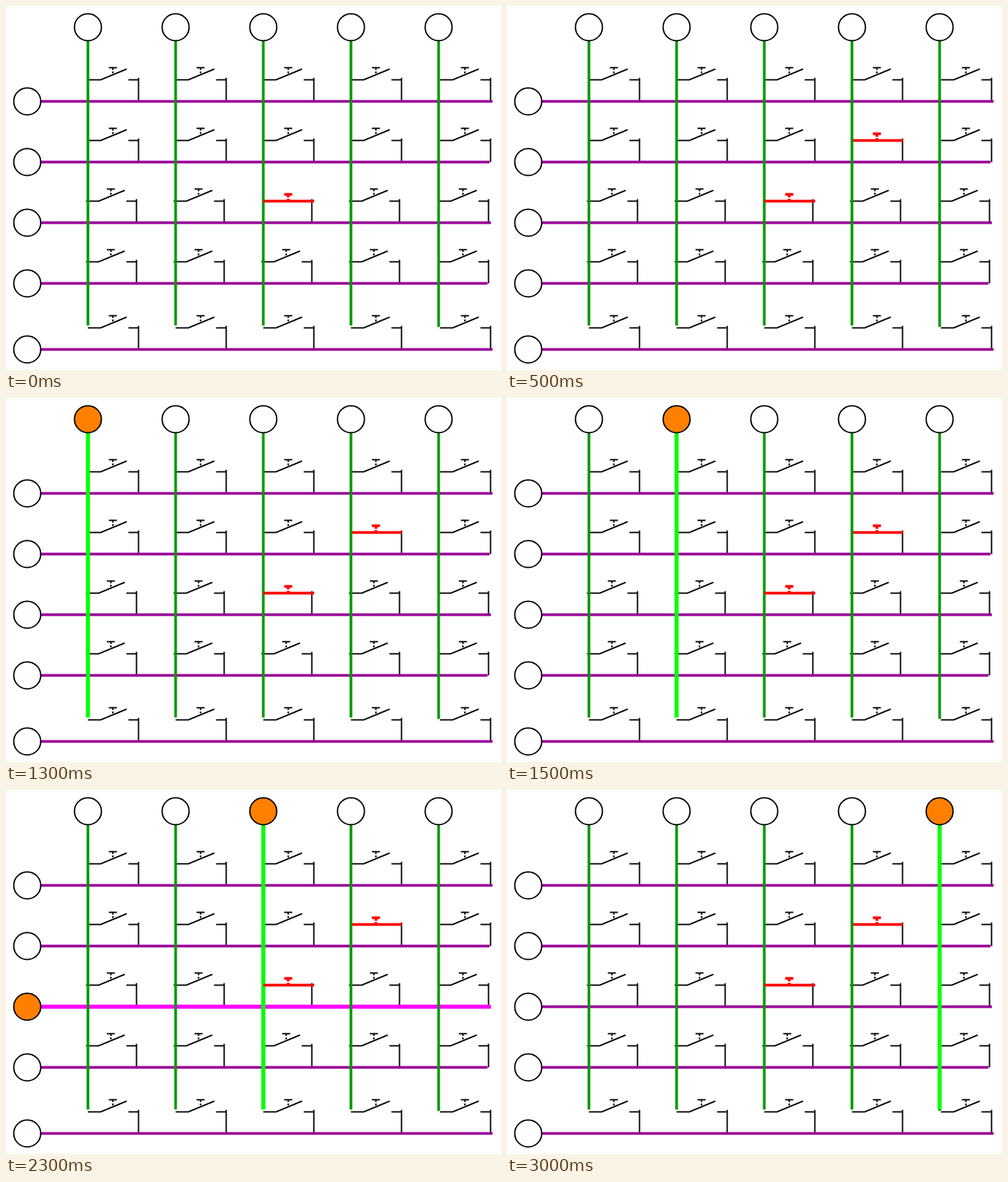
Recreate the animation shown at these times as an HTML page with a canvas. Size 734x540 px, loop 3.5 s.

```html
<!DOCTYPE html>
<html>
<head>
<meta charset="utf-8">
<style>
  html, body { margin: 0; width: 100%; height: 100%; overflow: hidden; background: #fff; }
  canvas { display: block; }
</style>
</head>
<body>
<canvas id="stage" width="734" height="540"></canvas>
<script>
const ctx = document.getElementById('stage').getContext('2d');
const STEP = 500, STEPS = 7;
const colX = [0, 1, 2, 3, 4].map(i => 121.5 + 130 * i);
const rowY = [141.5, 231.5, 321.5, 411.5, 509.5];
const rowEnd = [721.5, 717, 719, 714, 721.5];

function line(color, width, points, dash = []) {
  ctx.strokeStyle = color;
  ctx.lineWidth = width;
  ctx.setLineDash(dash);
  ctx.beginPath();
  for (let i = 0; i < points.length; i += 2) ctx.lineTo(points[i], points[i + 1]);
  ctx.stroke();
}

function lamp(x, y, lit) {
  ctx.setLineDash([]);
  ctx.beginPath();
  ctx.arc(x, y, 20, 0, 2 * Math.PI);
  ctx.fillStyle = lit ? '#ff8000' : '#fff';
  ctx.fill();
  ctx.strokeStyle = '#000';
  ctx.lineWidth = 2;
  ctx.stroke();
}

function openSwitch(x, y) {
  line('#000', 2, [x, y, x + 19, y, x + 57.5, y - 16]);
  line('#000', 2, [x + 60, y, x + 75, y]);
  line('#000', 2, [x + 31, y - 18, x + 43, y - 18]);
  line('#000', 2, [x + 37, y - 17.5, x + 37, y - 8.5], [3, 2]);
}

function closedSwitch(x, y) {
  line('#f00', 4, [x, y, x + 75.5, y]);
  line('#f00', 4, [x + 31, y - 10, x + 43, y - 10]);
  line('#f00', 4, [x + 37, y - 9, x + 37, y], [3.5, 2]);
}

function draw(step) {
  const activeCol = step - 2;
  const activeRow = { 2: 2, 3: 1 }[activeCol];
  const pressed = (r, c) => (r === 2 && c === 2) || (r === 1 && c === 3 && step > 0);

  ctx.fillStyle = '#fff';
  ctx.fillRect(0, 0, 734, 540);

  rowY.forEach((y, r) => colX.forEach((x, c) => {
    const left = x + (c === 4 ? 2 : 0) - (r === 2 || r === 3 ? 3 : 0);
    line('#000', 2, [left + 75, y - 35, left + 75, y]);
    if (!pressed(r, c)) openSwitch(left, y - 32);
    else if (c === 3) closedSwitch(x, y - 32);
  }));

  rowY.forEach((y, r) => {
    line('#909', 4, [51, y, rowEnd[r], y]);
    if (r === activeRow) line('#f0f', 6, [51, y, 719, y]);
    lamp(31.5, y, r === activeRow);
  });

  colX.forEach((x, c) => {
    line('#090', 4, [x, 51, x, c === 4 ? 476 : 474]);
    if (c === activeCol) line('#0f0', 6, [x, 51, x, 474]);
    lamp(x, 31.5, c === activeCol);
  });

  closedSwitch(colX[2], rowY[2] - 32);
}

function tick() {
  draw(Math.floor(performance.now() / STEP) % STEPS);
  requestAnimationFrame(tick);
}
tick();
</script>
</body>
</html>
```
